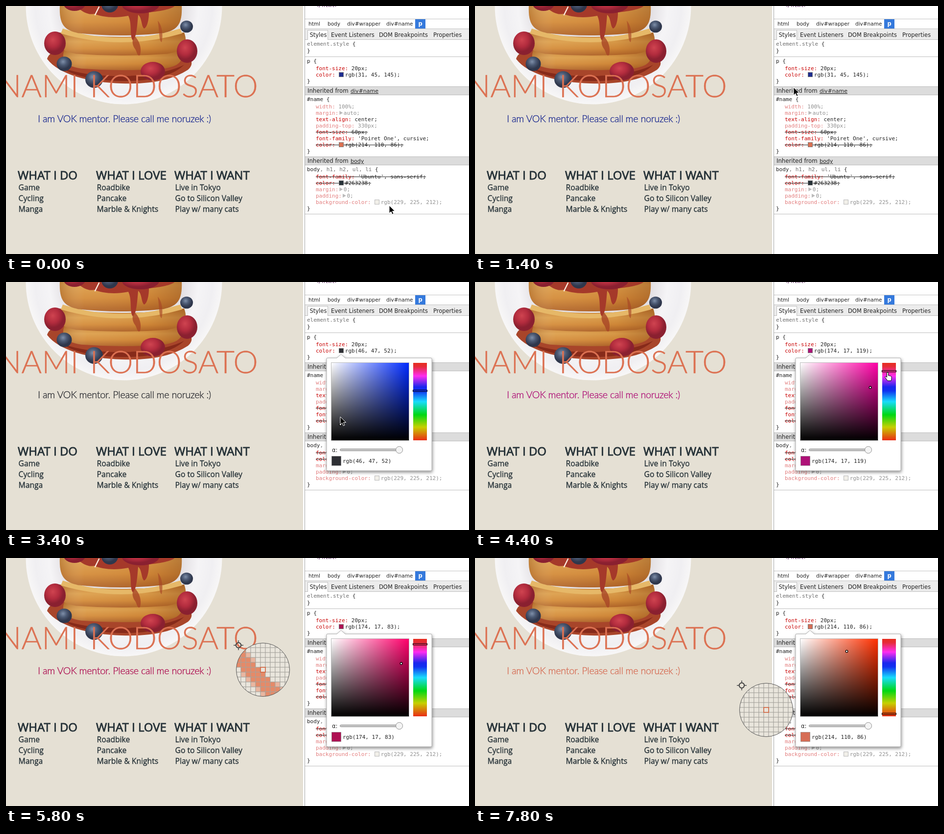
An HTML page for the animation above (8 s loop, 946 by 506 pixels).

```html
<!DOCTYPE html>
<html lang="en">
<head>
<meta charset="utf-8">
<title>Color picker demo</title>
<style>
  html, body { margin: 0; width: 100%; height: 100%; overflow: hidden; background: #fff; }
  svg { display: block; width: 100vw; height: 100vh; }
  text { white-space: pre; fill: #222; }
  .thin { font-family: Lato, Inter, sans-serif; font-weight: 300; stroke-width: .4px; }
  .name { font-size: 64px; word-spacing: 6px; fill: #dc7152; stroke: #dc7152; }
  .tagline { font-size: 19.8px; letter-spacing: -.28px; }
  .page { font: 15.7px "Open Sans", "Noto Sans", sans-serif; fill: #263238; stroke: #263238; stroke-width: .35px; }
  .head { font-size: 24px; stroke-width: .9px; }
  .ui { font: 11.5px "DejaVu Sans", "Open Sans", sans-serif; }
  .crumb { font-size: 10.5px; }
  .code { font: 11px "DejaVu Sans Mono", monospace; }
  .prop { fill: #c80000; }
  .dim { opacity: .5; }
  .grey { fill: #707070; }
</style>
</head>
<body>
<svg id="stage" viewBox="0 0 946 506" xmlns="http://www.w3.org/2000/svg">
  <defs>
    <clipPath id="plateClip"><circle cx="241" cy="0" r="200.5"/></clipPath>
    <clipPath id="lensClip"><circle r="54.5"/></clipPath>
    <radialGradient id="plate">
      <stop offset=".6" stop-color="#e3e0e4"/><stop offset=".76" stop-color="#f5f4f6"/>
      <stop offset=".9" stop-color="#f0eff2"/><stop offset="1" stop-color="#f8f7f7"/>
    </radialGradient>
    <linearGradient id="cake" x2="0" y2="1">
      <stop offset="0" stop-color="#c47b30"/><stop offset=".4" stop-color="#dda04c"/>
      <stop offset=".7" stop-color="#d48c3a"/><stop offset="1" stop-color="#b0652a"/>
    </linearGradient>
    <linearGradient id="sides">
      <stop offset="0" stop-color="#7d3d14" stop-opacity=".3"/><stop offset=".2" stop-color="#fff" stop-opacity=".05"/>
      <stop offset=".7" stop-color="#8a3d10" stop-opacity=".08"/><stop offset="1" stop-color="#7d3d14" stop-opacity=".4"/>
    </linearGradient>
    <radialGradient id="red" cx=".4" cy=".35">
      <stop offset="0" stop-color="#cf4450"/><stop offset=".6" stop-color="#b32c3e"/><stop offset="1" stop-color="#8a2030"/>
    </radialGradient>
    <radialGradient id="blue" cx=".42" cy=".35">
      <stop offset="0" stop-color="#7f8fa9"/><stop offset=".5" stop-color="#4c5a74"/><stop offset="1" stop-color="#2f374c"/>
    </radialGradient>
    <linearGradient id="hues" x2="0" y2="1">
      <stop offset="0" stop-color="#e62d1e"/><stop offset=".05" stop-color="#e62c3a"/>
      <stop offset=".17" stop-color="#ff2df0"/><stop offset=".31" stop-color="#1a26ee"/>
      <stop offset=".36" stop-color="#1030f0"/>
      <stop offset=".5" stop-color="#18dcfc"/><stop offset=".67" stop-color="#00d814"/>
      <stop offset=".83" stop-color="#c6d000"/><stop offset="1" stop-color="#ea2c14"/>
    </linearGradient>
    <linearGradient id="white">
      <stop offset="0" stop-color="#fff"/><stop offset="1" stop-color="#fff" stop-opacity="0"/>
    </linearGradient>
    <linearGradient id="black" x2="0" y2="1">
      <stop offset="0" stop-opacity="0"/><stop offset="1"/>
    </linearGradient>
    <filter id="shadow" x="-10%" y="-10%" width="125%" height="125%">
      <feDropShadow dx="1" dy="3" stdDeviation="3" flood-opacity=".45"/>
    </filter>
  </defs>

  <rect width="607" height="506" fill="#e5e0d4"/>
  <g id="photo" clip-path="url(#plateClip)"></g>
  <g id="page"></g>

  <rect x="607" width="339" height="506" fill="#fff"/>
  <rect x="610" width="1" height="506" fill="#a3a3a3"/>
  <g id="tools"></g>

  <g id="checks"></g>

  <g id="popup">
    <path d="M657 155H676L684.500 147.500 693 155H868Q870 155 870 157V383Q870 385 868 385H657Q655 385 655 383V157Q655 155 657 155Z"
      fill="#fff" stroke="#a8a8a8" filter="url(#shadow)"/>
    <rect id="hueFill" x="665" y="165" width="158" height="158"/>
    <rect x="665" y="165" width="158" height="158" fill="url(#white)"/>
    <rect x="665" y="165" width="158" height="158" fill="url(#black)"/>
    <rect x="664.500" y="164.500" width="159" height="159" fill="none" stroke="#bbb"/>
    <circle id="dot" r="2.200" fill="#fff" stroke="#000" stroke-width="1.300"/>
    <rect x="832" y="165" width="28" height="158" fill="url(#hues)"/>
    <rect id="hueMark" x="831.500" width="29" height="3" fill="none" stroke="#000"/>
    <text class="ui" x="666" y="347">α:</text>
    <rect x="682.500" y="340.500" width="122" height="4" rx="2" fill="#c9c9c9" stroke="#8c8c8c"/>
    <circle cx="803.500" cy="342.500" r="7" fill="#f4f4f4" stroke="#8c8c8c"/>
    <rect id="bigSwatch" x="665.500" y="355.500" width="19" height="19" stroke="#777" stroke-opacity=".6"/>
    <text id="bigLabel" class="code" x="688" y="369"></text>
  </g>

  <g id="lens">
    <g id="lensBody"></g>
    <g fill="none" stroke="#444">
      <circle r="5.200" stroke-width="2"/>
      <path d="M0-10V-6M0 6V10M-10 0H-6M6 0H10" stroke-width="1.500"/>
    </g>
  </g>

  <path id="arrow" d="M0 0V16L3.800 12.500 6.400 18.200 9 17 6.500 11.500H11.500Z" stroke="#fff" stroke-linejoin="round"/>
  <g id="beam" fill="none">
    <path d="M-3-8Q0-8 0-6V6Q0 8-3 8M3-8Q0-8 0-6V6Q0 8 3 8M-2 3H2" stroke="#fff" stroke-width="2.600" opacity=".6"/>
    <path d="M-3-8Q0-8 0-6V6Q0 8-3 8M3-8Q0-8 0-6V6Q0 8 3 8M-2 3H2" stroke="#000" stroke-width="1.200"/>
  </g>
  <path id="hand" d="M-1.500 9V2Q-1.500 0 0 0T1.500 2V7Q3 6 4 7.500 5.500 6.700 6.300 8.200 8 8 8 9.700V13Q8 15 7 17.500H0L-5 10.500Q-5.800 8.800-4.300 8.500T-1.500 10.500Z"
    fill="#fff" stroke="#000" stroke-linejoin="round"/>
</svg>

<script>
const $ = id => document.getElementById(id);

function add(parent, tag, attrs, text) {
  const el = document.createElementNS('http://www.w3.org/2000/svg', tag);
  for (const name in attrs) el.setAttribute(name, attrs[name]);
  if (text !== undefined) el.textContent = text;
  parent.appendChild(el);
  return el;
}

// --- pancake plate ---
const photo = $('photo');
const path = (d, fill, extra) => add(photo, 'path', { d, fill, ...extra });
const oval = (cx, cy, rx, ry, fill) => add(photo, 'ellipse', { cx, cy, rx, ry, fill });

function pancake(l, r, top, bottom, bulge) {
  const mid = (l + r) / 2;
  const d = `M${l} ${top}C${l - 10} ${bottom - 10} ${l + 4} ${bottom} ${l + 34} ${bottom + bulge * .6}` +
    `Q${mid} ${bottom + bulge * 1.4} ${r - 34} ${bottom + bulge * .6}` +
    `C${r - 4} ${bottom} ${r + 10} ${bottom - 10} ${r} ${top}Q${mid} ${top + bulge * 2} ${l} ${top}Z`;
  path(d, 'url(#cake)');
  path(d, 'url(#sides)');
}

oval(241, 0, 201, 201, 'url(#plate)');
path('M84 108C90 88 122 82 160 88L340 92C378 98 388 116 372 130C340 150 300 160 236 158C170 156 108 140 84 108Z', '#a8452a');
path('M112 124C160 148 300 152 364 120C340 144 290 154 236 153C180 152 132 142 112 124Z', '#862a1a');
pancake(120, 356, 88, 123, 8);
pancake(109, 364, 54, 92, 9);
path('M116 46Q235 84 356 46L360 56Q235 92 112 56Z', '#e6b868');
pancake(113, 356, -30, 48, 12);
path('M135-5H345C350 4 322 10 292 13C292 30 288 44 282 46C276 40 278 24 270 18C268 44 266 66 259 70C252 62 258 36 250 20C220 26 196 22 180 16C170 18 160 16 135-5Z', '#a5392a');
path('M263 62C272 70 278 86 274 100C268 104 268 94 264 88C258 80 256 70 263 62Z', '#a84526', { opacity: .8 });
path('M310 30C318 38 322 58 318 74C312 70 314 52 310 30Z', '#a84526', { opacity: .65 });
path('M190 2L182 18', 'none', { stroke: '#fbe9dc', 'stroke-width': 2.5, 'stroke-linecap': 'round' });
for (const [x, y, rx, ry] of [[140, -6, 23, 16], [275, -2, 38, 17], [100, 76, 22, 24], [370, 92, 21, 24], [300, 133, 25, 19]])
  oval(x, y, rx, ry, 'url(#red)');
for (const [x, y, r] of [[212, -3, 17], [119, 118, 15.5], [180, 150, 18], [369, 42, 13]])
  oval(x, y, r, r * .95, 'url(#blue)');

// --- page text ---
const page = $('page');
add(page, 'text', { class: 'thin name', x: 515, y: 186, 'text-anchor': 'end' }, 'NAMI KODOSATO');
const tagline = add(page, 'text', { class: 'thin tagline', x: 242, y: 237, 'text-anchor': 'middle' },
  'I am VOK mentor. Please call me noruzek :)');
[
  ['WHAT I DO', 'Game', 'Cycling', 'Manga'],
  ['WHAT I LOVE', 'Roadbike', 'Pancake', 'Marble & Knights'],
  ['WHAT I WANT', 'Live in Tokyo', 'Go to Silicon Valley', 'Play w/ many cats']
].forEach(([title, ...items], col) => {
  const x = 24 + col * 160;
  add(page, 'text', { class: 'page head', x, y: 353.5 }, title);
  items.forEach((item, i) => add(page, 'text', { class: 'page', x: x + 1.5, y: 376 + i * 22 }, item));
});

// --- inspector ---
const tools = $('tools');
const CH = 6.62;
const box = (x, y, width, height, fill, extra) => add(tools, 'rect', { x, y, width, height, fill, ...extra });
const label = (x, y, text, cls, extra) => add(tools, 'text', { x, y, class: cls, ...extra }, text);

label(632, 1.5, '</html>', 'code', { style: 'fill:#55205a' });
box(611, 26, 335, 1, '#c4c4c4');
box(836, 27, 21, 19, '#3479dc');
[[618, 'html'], [657, 'body'], [697, 'div#wrapper'], [777, 'div#name']].forEach(([x, t]) => label(x, 40, t, 'ui crumb'));
label(842.5, 40, 'p', 'ui', { style: 'fill:#fff;font-weight:bold' });
box(611, 46, 335, 23, '#ececec');
box(611, 46, 335, 1, '#c4c4c4');
box(611, 68, 335, 1, '#bdbdbd');
box(616.5, 49.5, 41, 20, '#fff', { stroke: '#bdbdbd' });
box(616, 69, 43, 2, '#fff');
[[620.5, 'Styles'], [664, 'Event Listeners'], [762, 'DOM Breakpoints'], [873, 'Properties']].forEach(([x, t]) => label(x, 63, t, 'ui'));

function rule(x, y, text, rest) {
  const el = label(x, y, text, 'code');
  if (rest) add(el, 'tspan', { class: 'grey' }, rest[0]), add(el, 'tspan', {}, rest[1]);
}

function declare(y, prop, value, { dim, struck, swatch, arrow } = {}) {
  const g = add(tools, 'g', dim ? { class: 'dim' } : {});
  let x = 633 + (prop.length + (arrow ? 1 : 2)) * CH, chip;
  add(g, 'text', { class: 'code prop', x: 633, y }, prop).append(':');
  if (arrow) {
    add(g, 'path', { d: `M${x + 2} ${y - 8}l7 4-7 4z`, fill: '#777' });
    x += 10.5;
  }
  const valueX = swatch ? x + 13.5 : x;
  const text = add(g, 'text', { class: 'code', x: valueX, y }, value);
  if (struck) add(g, 'rect', { x: 633, y: y - 4, width: valueX + value.length * CH - 633, height: 1, fill: '#222' });
  if (swatch) chip = add(g, 'rect', { x: Math.round(x) + 1.5, y: y - 8.5, width: 9, height: 9, fill: swatch, stroke: '#777' });
  return { text, chip };
}

function inherited(y, from) {
  box(611, y, 335, 18, '#dcdcdc');
  box(611, y, 335, 1, '#bdbdbd');
  box(611, y + 17, 335, 1, '#bdbdbd');
  label(616, y + 13, 'Inherited from', 'ui', { style: 'font-size:11.7px' });
  label(704, y + 13, from, 'ui', { style: 'font-size:11px;text-decoration:underline' });
}

rule(615, 81, '', ['element.style', ' {']);
rule(615, 95, '}');
box(611, 103, 335, 1, '#bdbdbd');
rule(615, 116, 'p {');
declare(131, 'font-size', '20px;');
const live = declare(144, 'color', '', { swatch: '#000' });
rule(615, 157, '}');
inherited(164, 'div#name');
rule(615, 194, '#name {');
declare(209, 'width', '100%;', { dim: 1 });
declare(222, 'margin', 'auto;', { dim: 1, arrow: 1 });
declare(235, 'text-align', 'center;');
declare(248, 'padding-top', '330px;', { dim: 1 });
declare(261, 'font-size', '60px;', { struck: 1 });
declare(274, 'font-family', "'Poiret One', cursive;");
declare(287, 'color', 'rgb(214, 110, 86);', { struck: 1, swatch: '#dc7152' });
rule(615, 300, '}');
inherited(307, 'body');
rule(615, 337, 'body', [', h1, h2, ul, li', ' {']);
declare(352, 'font-family', "'Ubuntu', sans-serif;", { struck: 1 });
declare(365, 'color', '#263238;', { struck: 1, swatch: '#263238' });
declare(378, 'margin', '0;', { dim: 1, arrow: 1 });
declare(391, 'padding', '0;', { dim: 1, arrow: 1 });
declare(404, 'background-color', 'rgb(229, 225, 212);', { dim: 1, swatch: '#e5e1d4' });
rule(615, 417, '}');
box(611, 424, 335, 1, '#bdbdbd');

for (const y of [122.5, 135.5]) {
  add($('checks'), 'rect', { x: 617.5, y, width: 9, height: 9, rx: 2, fill: '#cfe0f7', stroke: '#6d7f9c' });
  add($('checks'), 'path', { d: `M619.500 ${y + 4}l2.500 3.500 5-8`, fill: 'none', stroke: '#111', 'stroke-width': 1.7 });
}

// --- magnifier: 11 x 11 cells ---
const lensBody = $('lensBody');
lensBody.setAttribute('transform', 'translate(50 50)');
const cells = add(lensBody, 'g', { 'clip-path': 'url(#lensClip)' });
const pixels = [];
for (let j = -5; j <= 5; j++)
  for (let i = -5; i <= 5; i++)
    pixels.push({ i, j, el: add(cells, 'rect', { x: i * 10 - 5, y: j * 10 - 5, width: 10, height: 10, stroke: '#a5a29c', 'stroke-width': .9 }) });
add(lensBody, 'rect', { x: -5, y: -5, width: 10, height: 10, fill: 'none', stroke: '#dd5528', 'stroke-width': 1.3 });
add(lensBody, 'circle', { r: 54.5, fill: 'none', stroke: '#555' });

function magnify(x, y) {
  for (const { i, j, el } of pixels) {
    // distance from the stroke of the last letter O
    const d = Math.abs(Math.hypot(x + i - 491, y + j - 163) - 24);
    el.setAttribute('fill', d < 1.4 ? '#e58a68' : d < 1.8 ? '#e9b6a0' : '#e9e5dc');
  }
}

// --- motion, in steps of 200 ms ---
const STEP = 200, STEPS = 40;
const POINTER = [
  [0, 783, 407, 'arrow'], [2, 783, 407, 'arrow'], [6, 662, 190, 'arrow'], [7, 651, 166, 'arrow'],
  [9, 685, 141, 'beam'], [10, 687, 143, 'beam'], [12, 687, 143, 'beam'], [13, 750, 195, 'arrow'],
  [14, 789, 233, 'arrow'], [16, 683, 288, 'arrow'], [17, 683, 275, 'arrow'], [18, 690, 280, 'arrow'],
  [20, 807, 215, 'arrow'], [21, 843, 222, 'hand'], [22, 843, 184, 'hand'], [24, 843, 176, 'hand'],
  [25, 843, 176, 'hand'], [26, 740, 180, 'arrow'], [27, 580, 190, 'lens'], [29, 475, 178, 'lens'],
  [31, 473, 180, 'lens'], [32, 473, 180, 'lens'], [36, 530, 245, 'lens'], [39, 545, 260, 'lens']
];
// step, hue, saturation, value
const COLOR = [
  [0, 232.63, .7862, .5686], [14, 232.63, .7862, .5686], [16, 230, .1154, .2039], [18, 230, .1154, .2039],
  [20, 232, .9023, .6824], [21, 232, .9023, .6824], [22, 321.02, .9023, .6824], [24, 334.78, .9023, .6824],
  [31, 334.78, .9023, .6824], [32, 11.25, .5981, .8392]
];

function sample(track, k) {
  let n = track.length - 1;
  while (track[n][0] > k) n--;
  const a = track[n], b = track[n + 1] || a;
  const f = b === a ? 0 : (k - a[0]) / (b[0] - a[0]);
  return a.slice(1).map((v, i) => typeof v === 'number' ? v + (b[i + 1] - v) * f : v);
}

function rgb(h, s, v) {
  const part = n => {
    const q = (n + h / 60) % 6;
    return Math.round(255 * v * (1 - s * Math.max(0, Math.min(q, 4 - q, 1))));
  };
  return `rgb(${part(5)}, ${part(3)}, ${part(1)})`;
}

const show = (id, on) => $(id).style.display = on ? '' : 'none';

function draw(k) {
  const [x, y, kind] = sample(POINTER, k);
  const [h, s, v] = sample(COLOR, k);
  const color = rgb(h, s, v);

  tagline.style.fill = tagline.style.stroke = color;
  live.chip.setAttribute('fill', color);
  live.text.textContent = color + ';';
  $('bigSwatch').setAttribute('fill', color);
  $('bigLabel').textContent = color;
  $('hueFill').setAttribute('fill', `hsl(${h}, 100%, 50%)`);
  $('hueMark').setAttribute('y', Math.round(323 - 158 * h / 360) - 1.5);
  $('dot').setAttribute('cx', 665 + 158 * s);
  $('dot').setAttribute('cy', 165 + 158 * (1 - v));

  show('popup', k >= 11);
  show('checks', k <= 12 && y > 103 && y < 160);
  for (const id of ['arrow', 'beam', 'hand', 'lens']) {
    show(id, id === kind);
    $(id).setAttribute('transform', `translate(${Math.round(x)} ${Math.round(y)})`);
  }
  if (kind === 'lens') magnify(Math.round(x), Math.round(y));
}

let shown = -1;
const start = performance.now();
function tick() {
  const k = Math.floor((performance.now() - start) / STEP) % STEPS;
  if (k !== shown) draw(shown = k);
  requestAnimationFrame(tick);
}
tick();
</script>
</body>
</html>
```
